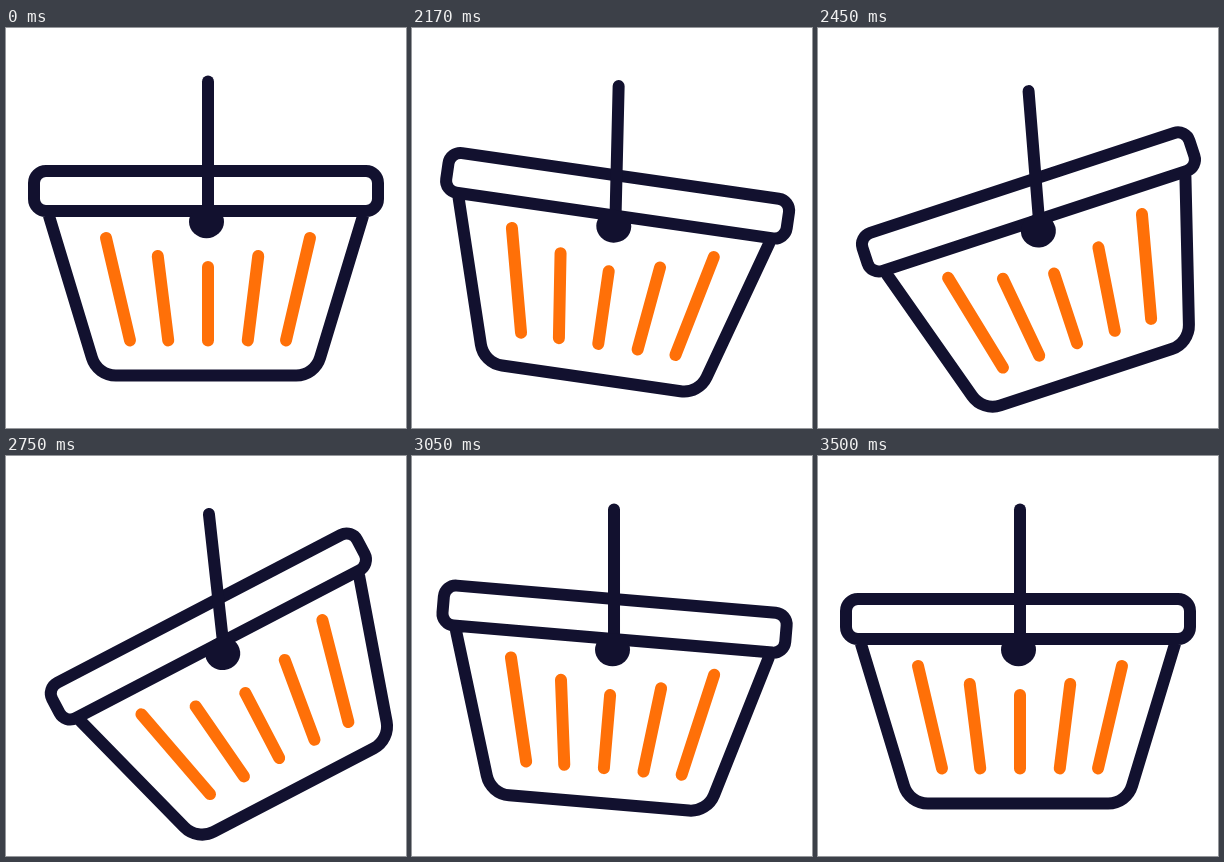
Write an HTML page with a canvas that moves like this. It is 400 px wide and 400 px high and loops after 3520 ms.

```html
<!DOCTYPE html>
<html lang="en">
<head>
<meta charset="utf-8">
<title>Swinging basket</title>
<style>
  html, body { margin: 0; width: 100%; height: 100%; overflow: hidden; background: #fff; }
  canvas { display: block; width: 100vw; height: 100vh; }
</style>
</head>
<body>
<canvas id="stage"></canvas>
<script>
const LOOP = 3520;
const NAVY = '#12112f';
const ORANGE = '#ff7008';
const TOP = { x: 202, y: 53.5 };
const KNOB = { x: 200.5, y: 193 };

const canvas = document.getElementById('stage');
const ctx = canvas.getContext('2d');

// Runs smoothly from 0 to 1 between two times.
function ease(t, from, to) {
  const u = Math.min(1, Math.max(0, (t - from) / (to - from)));
  return (1 - Math.cos(Math.PI * u)) / 2;
}

function poseAt(t) {
  const windUp = ease(t, 1990, 2214);
  const swing = ease(t, 2214, 2598);
  return {
    x: 9.2 * (ease(t, 1970, 2370) - ease(t, 2370, 2850)),
    y: 9.8 * (ease(t, 1970, 2390) - ease(t, 2390, 3080)),
    handle: 1.5 * windUp - 9 * swing + 7.5 * ease(t, 2640, 3060),
    basket: 9 * windUp - 40 * swing + 40 * ease(t, 2656, 3155) - 9 * ease(t, 3155, 3500)
  };
}

function rotateAround(point, degrees) {
  ctx.translate(point.x, point.y);
  ctx.rotate(degrees * Math.PI / 180);
  ctx.translate(-point.x, -point.y);
}

function line(x0, y0, x1, y1, color) {
  ctx.strokeStyle = color;
  ctx.beginPath();
  ctx.moveTo(x0, y0);
  ctx.lineTo(x1, y1);
  ctx.stroke();
}

function drawBars() {
  for (let i = -2; i <= 2; i++) {
    const bend = i ** 3 / 4;
    const top = 239 - 11 * Math.abs(i) ** 1.4;
    line(TOP.x + 50 * i + bend, top, TOP.x + 40 * i - bend, 312.4, ORANGE);
  }
}

function drawBasket() {
  ctx.strokeStyle = NAVY;
  ctx.beginPath();
  ctx.roundRect(28, 143, 344, 40, 12);
  ctx.moveTo(43, 188);
  ctx.arcTo(91.3, 347.5, 200, 347.5, 25);
  ctx.arcTo(308.7, 347.5, 357, 188, 25);
  ctx.lineTo(357, 188);
  ctx.stroke();
  drawBars();
}

function drawHandle() {
  line(TOP.x, TOP.y, TOP.x, 185, NAVY);
  ctx.fillStyle = NAVY;
  ctx.beginPath();
  ctx.ellipse(KNOB.x, KNOB.y + 0.7, 17.5, 16.5, 0, 0, Math.PI * 2);
  ctx.fill();
}

function draw(t) {
  const ratio = window.devicePixelRatio || 1;
  const width = Math.round(innerWidth * ratio);
  const height = Math.round(innerHeight * ratio);
  if (canvas.width !== width || canvas.height !== height) {
    canvas.width = width;
    canvas.height = height;
  }
  ctx.setTransform(width / 400, 0, 0, height / 400, 0, 0);
  ctx.fillStyle = '#fff';
  ctx.fillRect(0, 0, 400, 400);
  ctx.lineWidth = 12;
  ctx.lineCap = 'round';

  const pose = poseAt(t);
  ctx.translate(pose.x, pose.y);
  rotateAround(TOP, pose.handle);
  ctx.save();
  rotateAround(KNOB, pose.basket - pose.handle);
  drawBasket();
  ctx.restore();
  drawHandle();
}

const start = performance.now();
function tick() {
  draw((performance.now() - start) % LOOP);
  requestAnimationFrame(tick);
}
tick();
</script>
</body>
</html>
```
